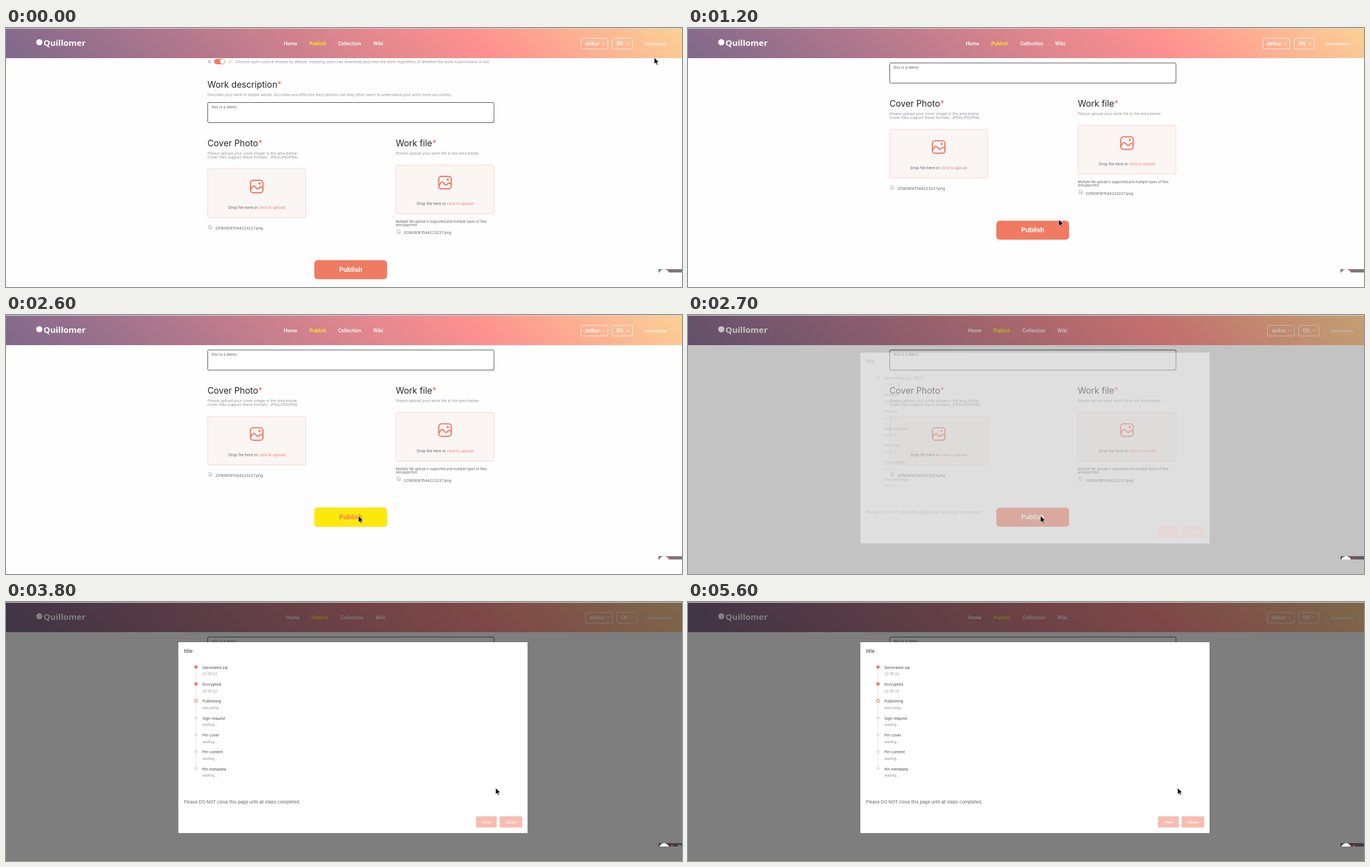
An HTML page for the animation above (8000 ms loop, 1208x464 px).

```html
<!DOCTYPE html>
<html lang="en">
<head>
<meta charset="utf-8">
<title>Publish a work</title>
<style>
  html, body { margin: 0; width: 100%; height: 100%; overflow: hidden; background: #fefefe; }
  svg { display: block; width: 1208px; height: 464px; font-family: Inter, sans-serif; }
  .ui { font-family: "Liberation Sans", Arial, sans-serif; }
  .logo { font-family: "Open Sans", sans-serif; }
</style>
</head>
<body>
<svg id="stage" viewBox="0 0 1208 464"></svg>
<script>
const ORANGE = '#f07b62', RED = '#f56c6c', GREY = '#93939b', DARK = '#25262b', BODY = '#606168';

const text = (x, y, str, size, fill, attrs = '') =>
  `<text x="${x}" y="${y}" font-size="${size}" fill="${fill}" ${attrs}>${str}</text>`;
const box = (x, y, w, h, r, fill, attrs = '') =>
  `<rect x="${x}" y="${y}" width="${w}" height="${h}" rx="${r}" fill="${fill}" ${attrs}/>`;
const line = (d, stroke, width = 1) =>
  `<path d="${d}" fill="none" stroke="${stroke}" stroke-width="${width}" stroke-linecap="round" stroke-linejoin="round"/>`;
const bold = 'font-weight="600"', centred = 'text-anchor="middle"';

const heading = (x, y, str) =>
  text(x, y, `${str}<tspan fill="${RED}">*</tspan>`, 15.5, DARK);
const note = (x, y, str) => text(x, y, str, 6.8, GREY);

const dropZone = (x, y) => `<g transform="translate(${x} ${y})">
  ${box(.5, .5, 175, 87, 2.5, '#fbf5f4', 'stroke="#f5d3cd"')}
  <g transform="translate(88 32)">
    ${box(-11.2, -11.2, 22.4, 22.4, 5, 'none', `stroke="${ORANGE}" stroke-width="2.2"`)}
    ${line('M-10 4.500C-7 -2 -4.500 -2.500 -2 1S2 5.500 4.500 2.500S7.500 .5 10 2', ORANGE, 2.2)}
    <circle cx="5" cy="-5.500" r="2" fill="${ORANGE}"/>
  </g>
  ${text(88, 71.8, `Drop file here or <tspan fill="${ORANGE}">click to upload</tspan>`, 6.8, BODY, centred)}
</g>`;

const fileRow = (x, y) =>
  line(`M${x + 3} ${y - 5.5}h3l2 2v4h-5zM${x + 4.5} ${y - 1.5}h2`, '#909399', .7) +
  text(x + 14, y + 2.4, '201608161544223227.png', 6.85, BODY);

const publishButton = (fill, ink, attrs = '') => `<g ${attrs}>
  ${box(551, 416, 130, 34, 6, fill)}
  ${text(616, 437.2, 'Publish', 11.4, ink, `${centred} font-weight="700"`)}
</g>`;

const page = `
  ${line('M361.500 58.500l4 4m0 -4l-4 4', '#555', .8)}
  ${box(372, 55.2, 19.5, 9.8, 4.9, ORANGE)}
  <circle cx="386.500" cy="60.100" r="4.100" fill="#fff"/>
  ${line('M397.500 60.500l1.800 1.800l3.500 -4', ORANGE, .8)}
  ${note(410.5, 62.5, 'Choose open-source release by default, meaning users can download and view the work regardless of whether the work is purchased or not.')}
  ${heading(360, 107, 'Work description')}
  ${note(360, 121.6, 'Describe your work in simple words. Accurate and effective descriptions can help other users to understand your work more accurately.')}
  ${box(360.5, 133.5, 511.5, 36, 2, '#fff', 'stroke="#4a4a4e"')}
  ${line('M867 168.500l4 -4M869.500 168.500l1.500 -1.500', '#999', .6)}
  ${text(367.5, 144.3, 'this is a demo', 6.85, BODY)}
  ${heading(360, 212, 'Cover Photo')}
  ${note(360, 226.8, 'Please upload your cover image in the area below.')}
  ${note(360, 233.6, 'Cover files support these formats: JPEG/JPG/PNG.')}
  ${dropZone(360, 252)}
  ${fileRow(360, 358.8)}
  ${heading(696.5, 212, 'Work file')}
  ${note(696.5, 226.8, 'Please upload your work file in the area below.')}
  ${dropZone(696.5, 245)}
  ${text(696.5, 348.8, 'Multiple file upload is supported,and multiple types of files', 5.88, BODY)}
  ${text(696.5, 354.8, 'aresupported.', 5.88, BODY)}
  ${fileRow(696.5, 367)}
  ${publishButton(ORANGE, '#fff')}
  ${publishButton('#ffe90a', ORANGE, 'id="hover"')}`;

const navItem = (x, str, fill = '#fff') => text(x, 31.3, str, 8.45, fill, `${bold} ${centred}`);
const select = (x, w, str) =>
  box(x + .5, 18.5, w, 19, 2, 'none', 'stroke="#fff" stroke-opacity=".85"') +
  text(x + 8, 31, str, 8.5, '#fff', bold) +
  line(`M${x + w - 11} 26.500l3 3l3 -3`, '#fff', .8);

const header = `
  ${box(0, 0, 1208, 54, 0, 'url(#sunset)')}
  <circle cx="59.500" cy="25.500" r="5.500" fill="#fff"/>
  ${text(67, 31.5, 'Quillomer', 15, '#fff', 'class="logo" font-weight="700"')}
  <g id="nav">
    ${navItem(508.5, 'Home')}${navItem(557, 'Publish', '#ffee1c')}
    ${navItem(614, 'Collection')}${navItem(665, 'Wiki')}
  </g>
  <g id="account">
    ${select(1027, 48, 'delkur')}${select(1083, 36, 'EN')}
    ${text(1140, 30.9, 'Connected', 7.85, '#fff', 'class="ui" font-weight="700" opacity=".85"')}
  </g>`;

// Each step is [label, status]; "done" steps come first, then the active one.
const timeline = (id, done, steps) => `<g id="${id}">${steps.map(([label, status], i) => {
  const y = 116.5 + 30.3 * i;
  const dot = i === done ? `r="2.500" fill="#fff" stroke="${ORANGE}" stroke-width="1.200"`
    : `r="3" fill="${i < done ? ORANGE : '#e2e4e8'}"`;
  return (i < steps.length - 1 ? line(`M339.500 ${y + 4}v23`, '#e2e4e8') : '') +
    `<circle cx="339.500" cy="${y}" ${dot}/>` +
    text(351, y + 3.2, label, 6.85, '#45464c') + text(351, y + 14.9, status, 6.25, '#8e9096');
}).join('')}</g>`;

const waiting = ['Sign request', 'Pin cover', 'Pin content', 'Pin metadata'].map(s => [s, 'waiting...']);
const modalButton = (x, w, str) =>
  box(x, 384, w, 20, 1.5, '#f7bdb1') + text(x + w / 2, 396.8, str, 7.9, '#fff', `class="ui" ${centred}`);

const modal = `
  ${box(308, 72, 624, 342, 1, '#fff', 'id="panel"')}
  <g id="content">
    ${text(318, 91, 'title', 9, '#303133')}
    ${timeline('early', 0, [['Generating zip, 100%', 'executing...'], ['Encrypt', 'waiting...'],
      ['Publish', 'waiting...'], ...waiting])}
    ${timeline('late', 2, [['Generated zip', '22:35:22'], ['Encrypted', '22:35:22'],
      ['Publishing', 'executing...'], ...waiting])}
    ${text(318, 361.3, 'Please DO NOT close this page until all steps completed.', 7.78, BODY)}
    ${modalButton(840, 37, 'View')}${modalButton(882, 40.5, 'Close')}
  </g>`;

document.getElementById('stage').innerHTML = `
  <defs>
    <linearGradient id="sunset" gradientUnits="userSpaceOnUse" x1="0" y1="54" x2="631" y2="-577">
      <stop stop-color="#7f688b"/><stop offset=".69" stop-color="#fe908f"/><stop offset="1" stop-color="#fbd194"/>
    </linearGradient>
    <clipPath id="widget"><rect x="1166" y="432" width="42" height="6"/></clipPath>
  </defs>
  ${box(0, 0, 1208, 464, 0, '#fefefe')}
  <g id="page">${page}</g>
  ${header}
  ${box(1166, 432, 42, 6, 0, '#7b7b7b')}
  ${box(0, 0, 1208, 464, 0, '#000', 'id="shade"')}
  <g id="modal">${modal}</g>
  ${box(0, 0, 1208, 1.2, 0, '#d3d5da')}
  <g clip-path="url(#widget)">
    <circle cx="1176" cy="441" r="9" fill="#fff"/>
    <circle cx="1190" cy="436.500" r="1.500" fill="#e0474c"/>
    ${text(1200.5, 440, '00', 6.5, '#ddd', 'id="clock" class="ui"')}
  </g>
  <path id="cursor" d="M0 0V11.500L2.700 9.100L4.500 13.200L6.300 12.400L4.500 8.400H8.100Z" fill="#000" stroke="#fff" stroke-width=".6"/>`;

// Linear interpolation through [time, value] points.
function track(t, points) {
  let [t0, v0] = points[0];
  for (const [t1, v1] of points) {
    if (t < t1) return t <= t0 ? v0 : v0 + (v1 - v0) * (t - t0) / (t1 - t0);
    [t0, v0] = [t1, v1];
  }
  return v0;
}

const cursorPath = [[0, 1158.5, 53], [200, 1132, 84], [300, 1132, 84], [700, 900, 215], [1200, 662.5, 343],
  [1400, 655, 351], [1800, 635, 355], [2100, 628, 348], [2300, 630, 360], [2700, 630, 360], [2800, 643, 361],
  [2900, 740, 350], [3000, 835, 338], [3100, 875, 333]];
const cursorX = cursorPath.map(([t, x]) => [t, x]);
const cursorY = cursorPath.map(([t, , y]) => [t, y]);

const el = id => document.getElementById(id);
const set = (id, name, value) => el(id).setAttribute(name, value);
const move = (id, x, y) => set(id, 'transform', `translate(${x} ${y})`);
const show = (id, visible) => set(id, 'opacity', visible ? 1 : 0);

function draw(now) {
  const t = Math.floor(now % 8000 / 100) * 100;  // the screen refreshes ten times a second
  const scroll = track(t, [[400, 0], [1000, 1]]);
  const open = track(t, [[2600, 0], [2700, .46], [2800, .88], [2900, 1]]);
  const locked = open > 0;  // the scrollbar goes away and the header widens

  move('page', 0, -70.8 * scroll * scroll * (3 - 2 * scroll));
  set('hover', 'opacity', track(t, [[1200, 0], [1500, 1], [2600, 1], [2700, 0]]));
  move('nav', locked ? 4 : 0, 0);
  move('account', locked ? 8 : 0, 0);
  set('shade', 'opacity', open / 2);
  move('modal', 0, -9 * (1 - open));
  set('panel', 'opacity', open);
  set('content', 'opacity', open * open);
  show('early', t < 2800);
  show('late', t >= 2800);
  show('clock', t >= 3800 && t < 5600);
  move('cursor', track(t, cursorX), track(t, cursorY));
  requestAnimationFrame(draw);
}
draw(0);
</script>
</body>
</html>
```
